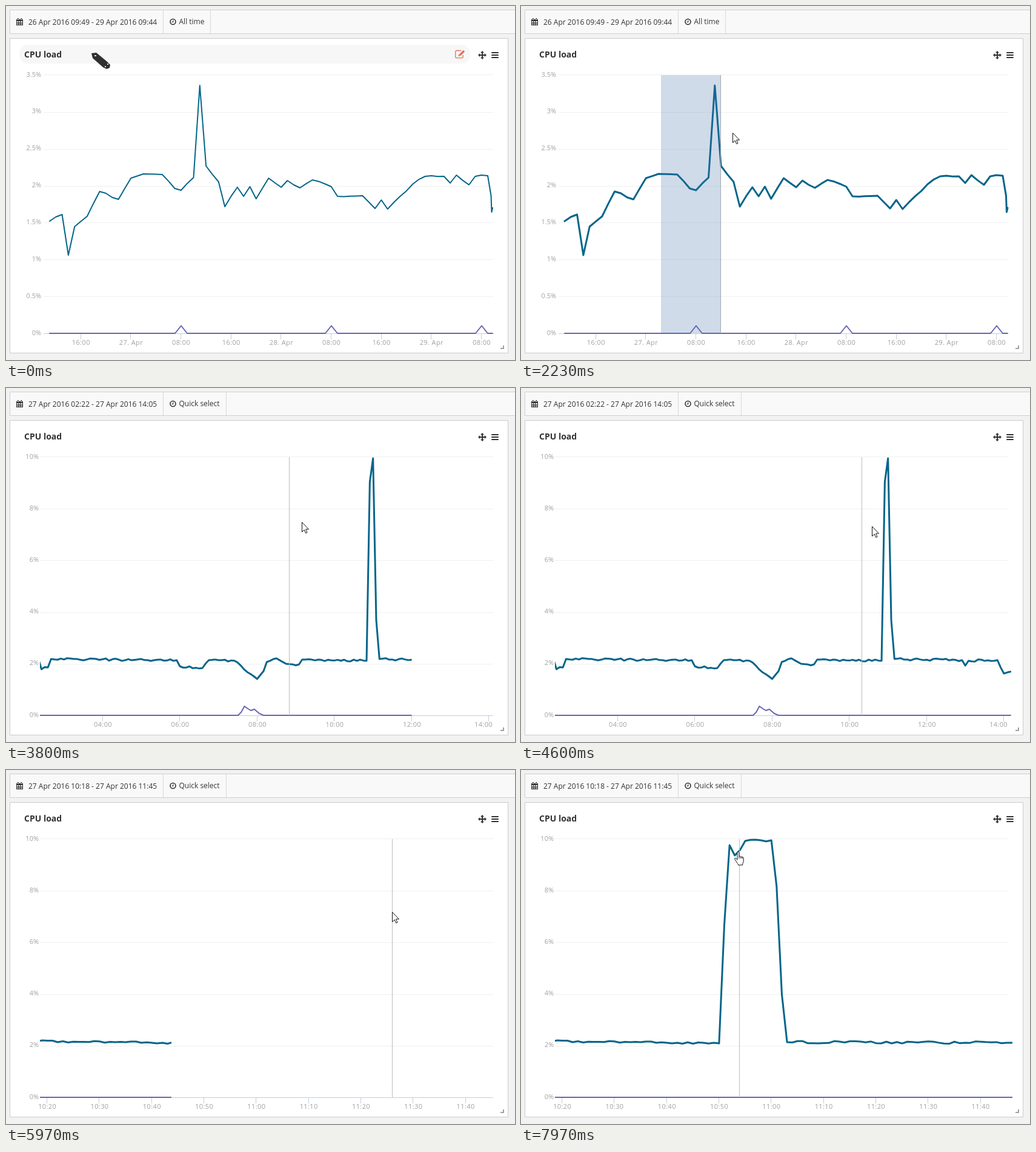
An HTML page for the animation above (8 s loop, 840 by 584 pixels).

```html
<!DOCTYPE html>
<html lang="en">
<head>
<meta charset="utf-8">
<title>CPU load</title>
<style>
html, body { margin: 0; width: 100%; height: 100%; overflow: hidden; background: #f2f2f2; }
svg { display: block; width: 840px; height: 584px; font: 12px "Open Sans", sans-serif; }
.axis text { font-size: 11px; fill: #a0a0a0; }
.axis .x { text-anchor: middle; letter-spacing: .4px; }
.axis .y { text-anchor: end; }
.grid { stroke: #f0f0f0; }
.tick { stroke: #c0d0e0; }
.line { fill: none; stroke-linejoin: round; stroke-linecap: round; }
.cpu { stroke: #04658a; }
.io { stroke: #6a64b4; stroke-width: 2; }
</style>
</head>
<body>
<svg viewBox="0 0 840 584">
  <defs><clipPath id="reveal"><rect id="window" x="56" y="112" width="754" height="432"/></clipPath></defs>

  <path d="M841 6.5H6.5V45.5H841" fill="#f9f9f9" stroke="#d0d0d0"/>
  <path id="dividers" stroke="#d8d8d8"/>
  <g fill="#333">
    <path d="M17 22h11v10h-11zM18 25v2h2v-2zm3 0v2h2v-2zm3 0v2h3v-2zM18 28v3h2v-3zm3 0v3h2v-3zm3 0v3h3v-3zM19 20h1.6v3h-1.6zM24.5 20h1.6v3h-1.6z" fill-rule="evenodd"/>
    <path d="M18 29.500h9" stroke="#333"/>
    <text id="range" x="37" y="31"></text>
    <circle cx="275.5" cy="26" r="4.5" fill="none" stroke="#333" stroke-width="1.6"/>
    <path d="M275.8 23.5V26.5H273.6" fill="none" stroke="#333" stroke-width="1.1"/>
    <text id="preset" x="285.5" y="30"></text>
  </g>

  <rect x="6.5" y="53.5" width="822" height="519" fill="#fff" stroke="#ccc"/>
  <g id="hover">
    <rect x="22" y="64" width="744" height="31" rx="14" fill="#f7f7f7"/>
    <g fill="none" stroke="#e57355">
      <path d="M751 73.5H744q-2.3 0-2.3 2.3V83.4q0 2.3 2.3 2.3H752q2.3 0 2.3-2.3V81" stroke-width="1.3"/>
      <path d="M749 81L756 74" stroke-width="3.4"/>
      <path d="M746.5 83L747 79.5 750 82.5Z" fill="#e57355" stroke="none"/>
    </g>
  </g>
  <text x="30" y="85" font-size="14" font-weight="700" fill="#333">CPU load</text>
  <path d="M786 74l3 3.2h-2V80h2.8v-2l3.2 3-3.2 3v-2H787v2.8h2l-3 3.2-3-3.2h2V82h-2.8v2L779 81l3.2-3v2H785V77.2h-2z" fill="#333"/>
  <path d="M802 77h10M802 81h10M802 85h10" stroke="#333" stroke-width="2" stroke-linecap="round"/>
  <path d="M816 565H821V560" fill="none" stroke="#888" stroke-width="1.6"/>

  <g id="charts"></g>
  <path id="cross" stroke="#bdbdbd"/>
  <rect id="select" y="114" height="426" fill="#4572a7" fill-opacity=".25"/>

  <g id="cursor">
    <g><path d="M0 1L8 0 25 14 31 20 30 25 25 27 19 24 2 9Z" fill="#303030"/><path d="M5 4h3v2h-3zM22 22h2v2h-2zM26 18h2v2h-2z" fill="#ddd"/></g>
    <path d="M.5 .5V16.5L4.200 13 6.700 18.500 9 17.500 6.600 12H11.500Z" fill="#fff" stroke="#111"/>
    <path transform="translate(-7 0)" d="M5 2.5a1.5 1.5 0 0 1 3 0V9c0-1.2 2.6-1 2.6.5 0-1.2 2.4-.8 2.4.6 0-1 2.2-.6 2.2.8V16c0 3-1.7 3.5-1.7 6.8H6.5c0-2-1.8-3-2.6-4.8L.8 13c-.8-1.6 1.2-2.4 2.2-1.2L5 14.2ZM8 9v3M10.6 9.5V12M13 10V12.5" fill="#fff" stroke="#111"/>
  </g>
</svg>

<script>
const $ = id => document.getElementById(id);
const LOOP = 8000, LAG = 85, BASE = 540;

// Piecewise linear value of keys [position, value, ...] for one column.
function sample(keys, at, col = 1) {
  const i = keys.findIndex(k => k[0] >= at);
  if (i < 1) return (i ? keys[keys.length - 1] : keys[0])[col];
  const [a, b] = [keys[i - 1], keys[i]];
  return a[col] + (b[col] - a[col]) * (at - a[0]) / (b[0] - a[0]);
}

function random(seed) {
  return () => (seed = seed * 16807 % 2147483647) / 2147483647;
}

// One reading per index: straight runs between keys, with noise on the readings in between.
function readings(keys, noise, seed) {
  const rnd = random(seed);
  const count = keys[keys.length - 1][0] + 1;
  return Array.from({ length: count }, (_, i) =>
    sample(keys, i) + (keys.some(k => k[0] === i) ? 0 : (rnd() - .5) * noise));
}

const day = readings([
  [0, 355], [2, 344], [3, 411], [4, 364], [6, 347], [8, 306], [11, 319], [13, 284], [15, 277], [18, 278],
  [20, 301], [21, 304], [23, 283], [24, 131], [25, 264], [27, 290], [28, 331], [30, 299], [31, 314], [32, 298],
  [33, 318], [35, 284], [37, 299], [38, 288], [40, 300], [42, 287], [45, 298], [46, 314], [50, 313], [52, 334],
  [53, 320], [54, 335], [58, 294], [60, 281], [63, 281], [64, 292], [65, 279], [67, 295], [68, 281], [70, 280]], 3, 11);
const hours = readings([
  [0, 446], [1, 464], [3, 461], [4, 447], [36, 449], [43, 449], [44, 459], [51, 462], [53, 449], [61, 450],
  [66, 472], [68, 480], [70, 467], [71, 452], [74, 446], [77, 455], [81, 456], [82, 448], [102, 450], [103, 155],
  [104, 116], [105, 383], [106, 447], [127, 449], [128, 458], [129, 450], [138, 449], [140, 471], [142, 468]], 4, 5);
const minutes = readings([
  [0, 448], [32, 451], [33, 255], [34, 124], [35, 141], [36, 132], [37, 117], [42, 116], [43, 192], [44, 370],
  [45, 449], [88, 450]], 4, 8);

const spikes = [289, 537, 785].map(x => `L${x - 10} ${BASE}L${x} 527.5L${x + 10} ${BASE}`).join('');

const charts = [
  { start: 0, axis: 0, draw: [-1, 0], range: '26 Apr 2016 09:49 - 29 Apr 2016 09:44', preset: 'All time', edge: 337.5,
    left: 62, top: 3.5, rows: 7, x0: 71.9, dx: 10.33, data: day, tail: 'L800.5 313L801.5 340L803 333',
    io: `M72 ${BASE}${spikes}H803`, tick: 123.2, gap: 82.65,
    labels: ['16:00', '27. Apr', '08:00', '16:00', '28. Apr', '08:00', '16:00', '29. Apr', '08:00'] },
  { start: 2570, axis: 2710, draw: [2913, 4155], range: '27 Apr 2016 02:22 - 27 Apr 2016 14:05',
    preset: 'Quick select', edge: 363.5, left: 56, top: 10, rows: 5, x0: 53.1875, dx: 5.3125, data: hours, tail: '',
    io: `M50 ${BASE}H383L388 535L393.5 525L399 529L404 532L410 530L418 537L425 ${BASE}H808`, tick: 159.4, gap: 127.5,
    labels: ['04:00', '06:00', '08:00', '10:00', '12:00', '14:00'] },
  { start: 5530, axis: 5670, draw: [5690, 6470], range: '27 Apr 2016 10:18 - 27 Apr 2016 11:45',
    preset: 'Quick select', edge: 363.5, left: 56, top: 10, rows: 5, x0: 50.74, dx: 8.63, data: minutes, tail: '',
    io: `M50 ${BASE}H811`, tick: 67.6, gap: 86.3,
    labels: ['10:20', '10:30', '10:40', '10:50', '11:00', '11:10', '11:20', '11:30', '11:40'] }
];

function chartMarkup(c) {
  let axis = '';
  for (let i = 0; i <= c.rows; i++) {
    const y = (i ? Math.round(114 + 426 * i / c.rows) : 113) + .5;
    const value = c.top * (c.rows - i) / c.rows;
    axis += `<path class="${i < c.rows ? 'grid' : 'tick'}" d="M${c.left} ${y}H804"/>` +
      `<text class="y" x="${c.left > 60 ? 58 : 54}" y="${Math.floor(117 + 426 * i / c.rows)}">${+value.toFixed(1)}%</text>`;
  }
  c.labels.forEach((label, i) => {
    const x = c.tick + i * c.gap;
    axis += `<path class="tick" d="M${Math.floor(x) + .5} 541v9"/>` +
      `<text class="x" x="${Math.min(x + .6, 788)}" y="559">${label}</text>`;
  });
  const cpu = 'M' + c.data.map((y, i) => `${(c.x0 + i * c.dx).toFixed(2)} ${y.toFixed(2)}`).join('L') + c.tail;
  return `<g><g class="axis">${axis}</g><g clip-path="url(#reveal)">` +
    `<path class="line io" d="${c.io}"/><path class="line cpu" d="${cpu}"/></g></g>`;
}
$('charts').innerHTML = charts.map(chartMarkup).join('');
const groups = [...$('charts').children];
const pointers = [...$('cursor').children];

// time, x, y
const path = [
  [30, 141, 77], [430, 112, 84], [1130, 112, 84], [1310, 134, 114], [1400, 195, 192], [1600, 231, 200],
  [1700, 231, 200], [2245, 352, 209], [3200, 353, 209], [4130, 562, 228], [4500, 562, 228], [4600, 579, 228],
  [5085, 654, 233], [5670, 654, 233], [6540, 605, 237], [6730, 424, 242], [7000, 322, 200], [7600, 366, 134],
  [7880, 359, 134]];
const drags = [{ from: 1700, to: 2570, x: 231 }, { from: 4500, to: 5530, x: 562 }];

const swing = p => .5 - Math.cos(Math.PI * Math.max(0, Math.min(1, p))) / 2;
const show = (el, on) => { el.style.display = on ? '' : 'none'; };
const pointerAt = t => [sample(path, t, 1), sample(path, t, 2)];

function render(t) {
  const n = charts.filter(c => t >= c.start).length - 1;
  const c = charts[n];
  const ready = t >= c.axis;
  groups.forEach((g, i) => show(g, i === n && ready));
  $('range').textContent = c.range;
  $('preset').textContent = c.preset;
  $('dividers').setAttribute('d', `M259.5 7V45M${c.edge} 7V45`);
  show($('hover'), t < 1200);

  const [from, to] = c.draw;
  $('window').setAttribute('width', 755 * swing((t - from) / (to - from)));

  // The crosshair trails the pointer and snaps to the nearest reading.
  const [lx, ly] = pointerAt(t - LAG);
  const inside = ly >= 114;
  const snapped = Math.round(c.x0 + Math.round((lx - c.x0) / c.dx) * c.dx) - .5;
  show($('cross'), inside && ready);
  $('cross').setAttribute('d', `M${snapped} 114V540`);
  groups[n].querySelector('.cpu').style.strokeWidth = inside ? 3 : 2;

  const drag = drags.find(d => t >= d.from && t < d.to);
  const width = drag ? lx - drag.x : 0;
  show($('select'), width > 4);
  if (width > 4) {
    $('select').setAttribute('x', drag.x);
    $('select').setAttribute('width', width);
  }

  const [x, y] = pointerAt(t);
  const kind = t < 1200 ? 0 : t < 7300 ? 1 : 2;
  pointers.forEach((p, i) => show(p, i === kind));
  $('cursor').setAttribute('transform', `translate(${Math.round(x)} ${Math.round(y)})`);
}

const origin = performance.now();
function tick() {
  render((performance.now() - origin) % LOOP);
  requestAnimationFrame(tick);
}
tick();
</script>
</body>
</html>
```
